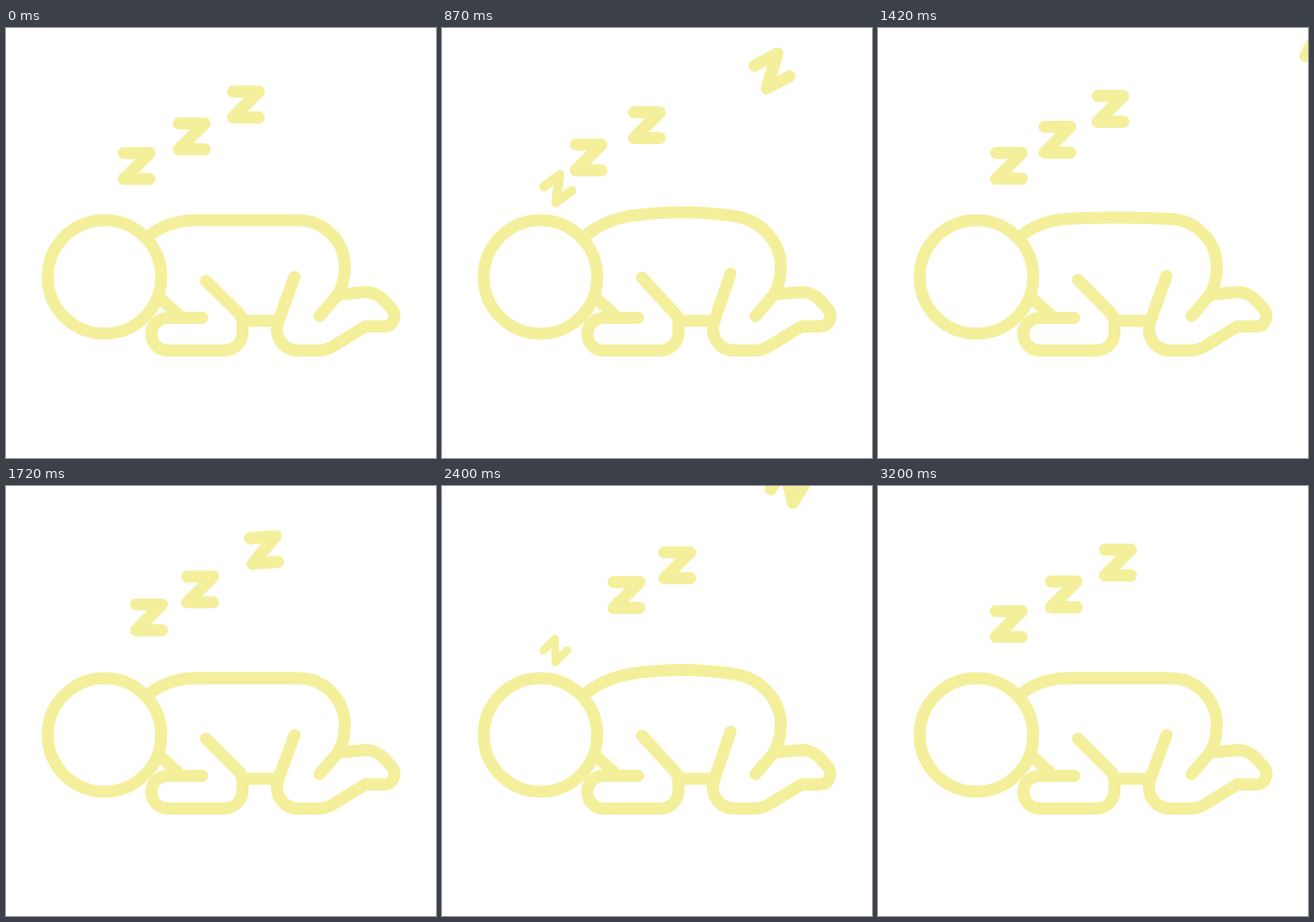
These frames come from a looping animation (500x500 px, 3220 ms). An HTML page:

```html
<!DOCTYPE html>
<html lang="en">
<head>
<meta charset="utf-8">
<title>Sleeping baby</title>
<style>
  html, body { margin: 0; width: 100%; height: 100%; overflow: hidden; background: #fff; }
  svg { display: block; width: 100%; height: 100%; }
</style>
</head>
<body>
<svg viewBox="0 0 500 500" fill="none" stroke="#f4ef9b" stroke-width="14" stroke-linecap="round" stroke-linejoin="round">
  <circle cx="114.5" cy="289.5" r="66"/>
  <path id="body"/>
  <path d="M386 310L418 307Q431 307 440 317L449 327C455 336 450 347 440 347H418L382 369Q373 375 364 375M386 310L364.500 335M277 340.500H315M180 315L200 333"/>
  <g id="zs"></g>
</svg>
<script>
const LOOP = 3220, START = 200, BREATH = 1500;
const body = document.getElementById('body');
const zs = document.getElementById('zs');

// A letter is born at the head, rests at up to three stops, then flies off.
const stops = [{ x: 122, y: 206 }, { x: 152, y: 160.5 }, { x: 216, y: 126 }, { x: 279, y: 89 }];
const LAST = stops.length - 1;

// Each move [start, duration] carries the letter one stop further.
const letters = [
  { stop: 3, moves: [[305, 1260]], exit: { x: 526, ys: [89, 9, 89, 19], power: 1 } },
  { stop: 2, moves: [[270, 1500], [1420, 1190]], exit: { x: 414, ys: [89, 44, 103, -30], power: 1.4 } },
  { stop: 1, moves: [[425, 1260], [1425, 1190]] },
  { stop: 0, moves: [[415, 1020], [1375, 1130]] },
  { stop: 0, moves: [[2120, 740]] }
];
for (const letter of letters) {
  letter.el = document.createElementNS('http://www.w3.org/2000/svg', 'path');
  letter.el.setAttribute('d', 'M-15-15H15L-15 15H15');
  zs.append(letter.el);
}

const lerp = (a, b, u) => a + (b - a) * u;

function ease(u) {
  u = Math.min(1, Math.max(0, u));
  return u * u * (3 - 2 * u);
}

function bezier([a, b, c, d], u) {
  const v = 1 - u;
  return v * v * v * a + 3 * v * v * u * b + 3 * v * u * u * c + u * u * u * d;
}

function place({ stop, moves, exit }, t) {
  const at = moves.reduce((sum, [start, length]) => sum + ease((t - start) / length), stop);
  if (exit && at >= LAST) {
    const u = at - LAST;
    return {
      x: lerp(stops[LAST].x, exit.x, u), y: bezier(exit.ys, u),
      turn: -66 * u ** exit.power, size: u < 1 ? 1 : 0
    };
  }
  const i = Math.min(Math.floor(at), LAST - 1), u = at - i;
  const young = Math.max(0, 1 - at);
  return {
    x: lerp(stops[i].x, stops[i + 1].x, u), y: lerp(stops[i].y, stops[i + 1].y, u),
    turn: -80 * young ** 1.4, size: 1 - young ** 2.7
  };
}

function draw(t) {
  const b = Math.sin(Math.PI * Math.max(0, t - START) / BREATH) ** 2;
  const y = 223.5 - 5 * b, bulge = y - 6 * b, side = y + 4.5 * b, lift = 3.8 * b;
  body.setAttribute('d',
    `M166 242Q188 ${side + 1} 218 ${y}C258 ${bulge} 300 ${bulge} 340 ${y}C370 ${side} 394 248 394 278C394 290 391 301 386 310` +
    `M232.500 ${294 - lift}L270 331Q275 336 275 343V354A21 21 0 0 1 254 375H188A19 19 0 0 1 188 337H228` +
    `M335.500 ${289.5 - lift}L317 340C310 359 323 375 340 375H364`);
  for (const letter of letters) {
    const { x, y, turn, size } = place(letter, t);
    letter.el.setAttribute('transform', `translate(${x} ${y}) rotate(${turn}) scale(${size})`);
    letter.el.style.display = size > 0.01 ? '' : 'none';
  }
}

const begin = performance.now();
function tick() {
  draw((performance.now() - begin) % LOOP);
  requestAnimationFrame(tick);
}
tick();
</script>
</body>
</html>
```
